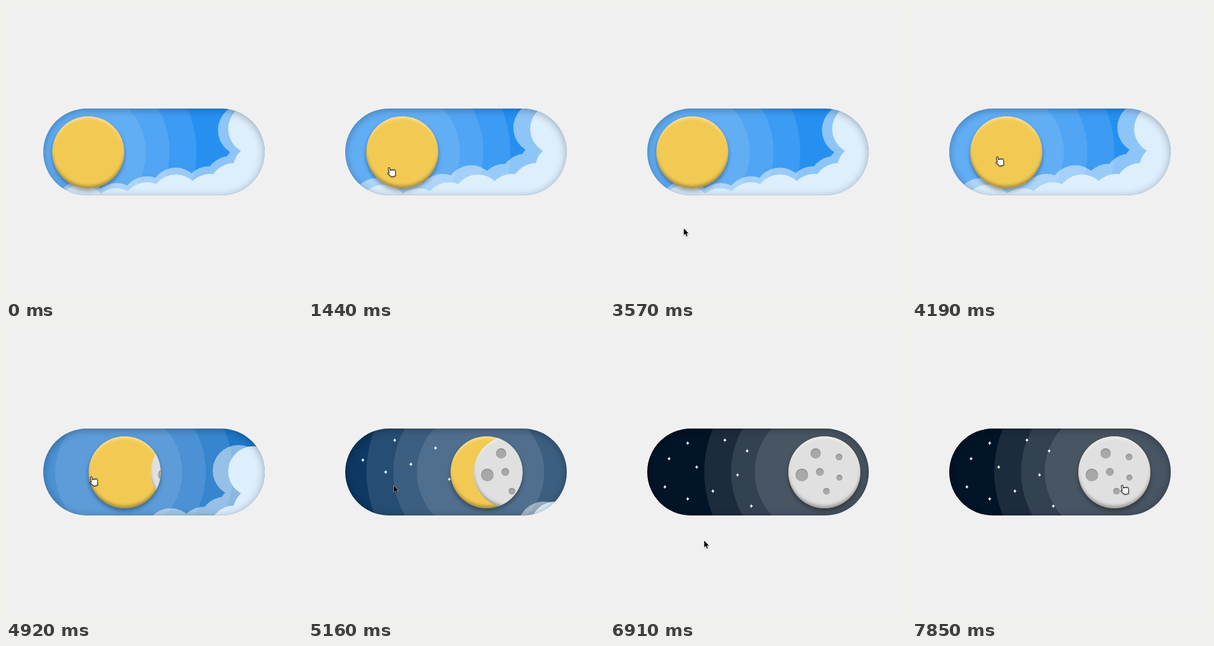
An HTML page that plays this animation: 493 by 487 pixels, repeating every 8000 ms.

```html
<!DOCTYPE html>
<html lang="en">
<head>
<meta charset="utf-8">
<title>Day and night switch</title>
<style>
  html, body { margin: 0; width: 100%; height: 100%; overflow: hidden; background: #f0f0f0; }
  div, svg { position: absolute; }
  #pill { left: 62px; top: 171px; width: 369px; height: 145px; border-radius: 73px; overflow: hidden; }
  #pill > svg { left: 0; top: 0; }
  #edge { inset: 0; border-radius: inherit; box-shadow: inset 0 2px 14px rgba(0,0,0,.3); }
  #ball, #moon { width: 120px; height: 120px; border-radius: 50%; }
  #ball { top: 13px; left: 0; box-shadow: 0 4px 7px rgba(0,0,0,.36); }
  #sun { inset: 0; border-radius: 50%; overflow: hidden; background: #f2ca53; }
  #moon { background: #e0e0e0; }
  .bevel { box-shadow: inset 0 5px 5px -2px rgba(255,255,255,.45), inset 0 -5px 5px -1px rgba(0,0,0,.3); }
  .crater { border-radius: 50%; background: #a8a8a8; box-shadow: inset 0 1px 2px rgba(0,0,0,.25); }
  #cursor { left: 0; top: 0; overflow: visible; filter: drop-shadow(0 1px 1px rgba(0,0,0,.3)); }
</style>
</head>
<body>
<div id="pill">
  <svg width="369" height="145" viewBox="62 171 369 145">
    <rect id="sky" x="62" y="171" width="369" height="145"/>
    <g id="rings" fill="#fff" fill-opacity=".1">
      <circle cy="243.5" r="190"/><circle cy="243.5" r="145.5"/><circle cy="243.5" r="106"/>
    </g>
    <path id="stars" fill="#fff"/>
    <path id="back" fill="#fff" fill-opacity=".48"/>
    <path id="front" fill="#ddeefc"/>
  </svg>
  <div id="edge"></div>
  <div id="ball"><div id="sun" class="bevel"><div id="moon" class="bevel"></div></div></div>
</div>
<svg id="cursor" width="20" height="20" stroke-linejoin="round">
  <path id="arrow" stroke="#fff" paint-order="stroke" d="M0 0V11L2.6 8.6L4.5 13L6 12.3L4.2 8.2H7.7Z"/>
  <path id="hand" fill="#fff" stroke="#111" transform="rotate(-12)"
    d="M-1.5 9V.8a1.3 1.3 0 0 1 2.6 0v4.4a1.3 1.3 0 0 1 2.6 0a1.3 1.3 0 0 1 2.6 .4a1.3 1.3 0 0 1 2.6 .6v4L7.5 15.5H1L-4 9a1.4 1.4 0 0 1 2.5-1z"/>
</svg>
<script>
const LOOP = 8000;
const el = id => document.getElementById(id);
const lerp = (a, b, k) => a + (b - a) * k;
const clamp = k => Math.max(0, Math.min(1, k));

// cubic-bezier(.25, .1, .25, 1)
function ease(x) {
  const curve = (s, a, b) => 3 * s * (1 - s) ** 2 * a + 3 * s * s * (1 - s) * b + s ** 3;
  let lo = 0, hi = 1;
  for (let i = 0; i < 20; i++) {
    const mid = (lo + hi) / 2;
    if (curve(mid, .25, .25) < x) lo = mid; else hi = mid;
  }
  return curve(lo, .1, 1);
}
const step = (t, start, length = 340) => ease(clamp((t - start) / length));

// One path of circles, so overlaps keep a single opacity
const cloud = (r, centres) => centres.map(([x, y]) =>
  `M${x - r} ${y}a${r} ${r} 0 1 1 ${2 * r} 0a${r} ${r} 0 1 1 ${-2 * r} 0z`).join('');
const puffs = [[412, 205], [420, 272], [380, 304], [340, 322], [283, 323], [235, 336], [184, 346], [126, 340]];
el('front').setAttribute('d', cloud(42, puffs));
// The back layer rises behind the low puffs and leans left at the tall end
el('back').setAttribute('d', cloud(43, puffs.map(([x, y]) => {
  const k = clamp((x - 126) / 286);
  return [x - 16 * k ** 8, y - 6 - 8 * k + 16 * k ** 16];
})));

// Four-point stars with pinched sides
el('stars').setAttribute('d', [
  [129, 195], [191, 190], [98, 221], [228, 208], [144, 235],
  [212, 248], [91, 268], [171, 275], [129, 288], [235, 300]
].map(([x, y]) => `M${x + .4} ${y - 2.9}q.5 2.8 2.8 3.3q-2.3.5-2.8 3.3q-.5-2.8-2.8-3.3q2.3-.5 2.8-3.3z`).join(''));

for (const [x, y, r] of [[45, 28, 8.5], [84, 34, 5.5], [22, 64, 10.5], [52, 59, 6.5], [85, 69, 5], [63, 91, 5.5]]) {
  const crater = document.createElement('div');
  crater.className = 'crater';
  crater.style.cssText = `left:${x - r}px;top:${y - r}px;width:${2 * r}px;height:${2 * r}px`;
  el('moon').append(crater);
}

// Cursor moves: start, end, x, y
const moves = [[590, 1050, 135, 270], [2020, 2180, 137, 295], [2330, 2620, 123, 371], [3570, 3950, 142, 252],
  [5050, 5520, 149, 351], [5630, 6300, 157, 358], [6910, 7850, 350, 266]];

const cursorAt = t => moves.reduce(([x, y], [from, to, nx, ny]) => {
  const k = clamp((t - from) / (to - from)), s = k * k * (3 - 2 * k);
  return [lerp(x, nx, s), lerp(y, ny, s)];
}, [117, 462]);

const day = [38, 144, 241], night = [2, 20, 39];

function draw(t) {
  const p = step(t, 4772, 940);
  const hover = step(t, 1100) - step(t, 2300) + step(t, 3840) - p + step(t, 7500);
  const x = 137 + 220 * p + 20 * hover * (t < 6000 ? 1 : -1);
  const drop = 185 * p;

  el('sky').setAttribute('fill', `rgb(${day.map((c, i) => lerp(c, night[i], p))})`);
  el('rings').setAttribute('transform', `translate(${x - 10})`);
  el('stars').setAttribute('transform', `translate(0 ${-150 * (1 - p)})`);
  el('stars').setAttribute('opacity', clamp(3 * p - .7));
  el('front').setAttribute('transform', `translate(0 ${drop})`);
  el('back').setAttribute('transform', `translate(${-11 * hover} ${drop - 4 * hover})`);
  el('ball').style.transform = `translateX(${x - 122}px)`;
  el('moon').style.transform = `translateX(${130 * (1 - p)}px)`;

  const [cx, cy] = cursorAt(t);
  const overBall = Math.hypot(cx - x, cy - 244) < 60;
  el('cursor').style.transform = `translate(${cx}px, ${cy}px)`;
  el('cursor').style.display = t < 590 ? 'none' : '';
  el('hand').style.display = overBall ? '' : 'none';
  el('arrow').style.display = overBall ? 'none' : '';
}

const start = performance.now();
function tick() {
  draw((performance.now() - start) % LOOP);
  requestAnimationFrame(tick);
}
tick();
</script>
</body>
</html>
```
